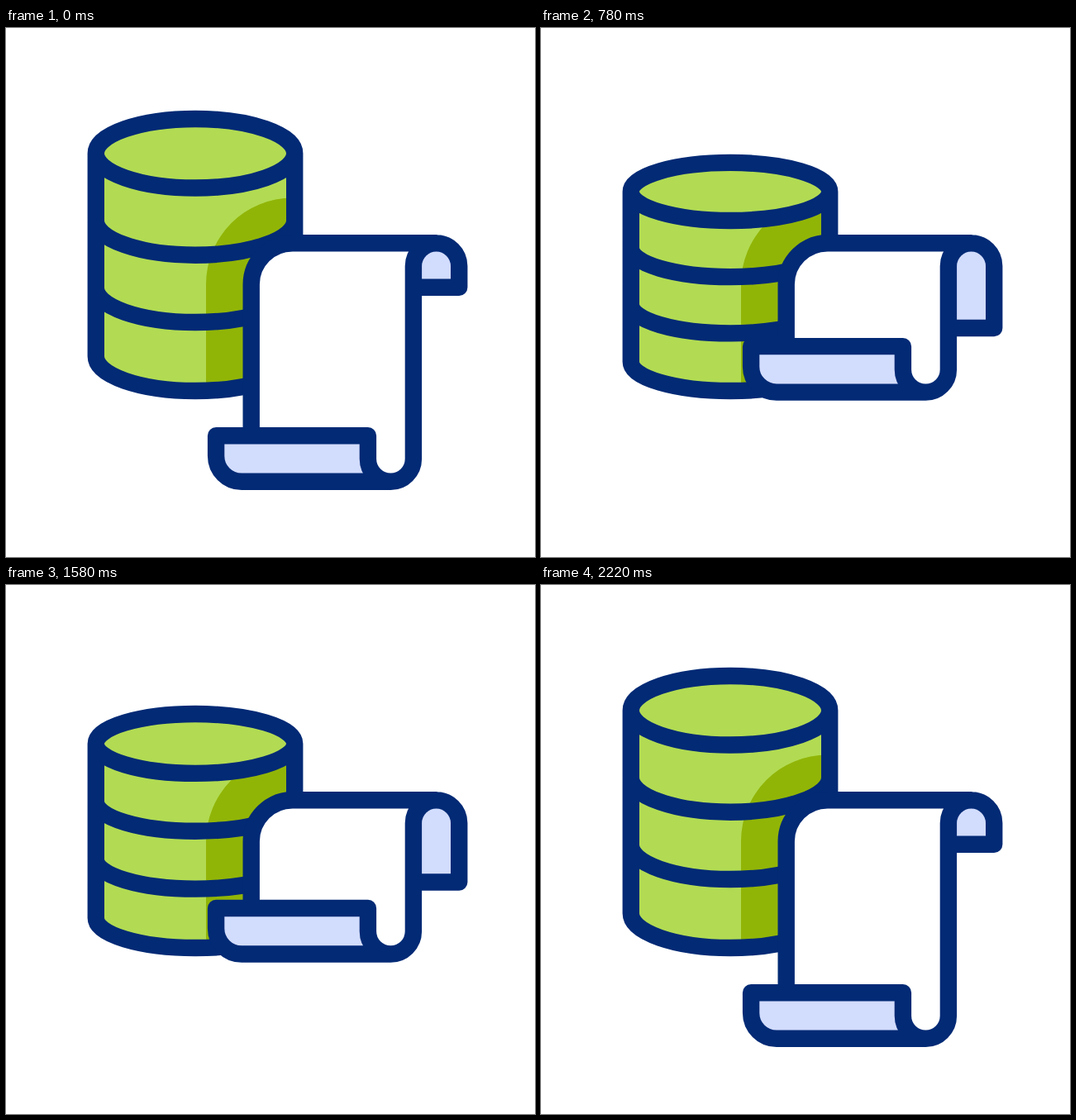
Animation, 640 px wide and 640 px high, one loop 2.42 s. Source, as an HTML page:

```html
<!DOCTYPE html>
<html lang="en">
<head>
<meta charset="utf-8">
<title>Database and scroll</title>
<style>
  html, body { margin: 0; width: 100%; height: 100%; overflow: hidden; background: #fff; }
  svg { display: block; width: 100vw; height: 100vh; }
  .line { fill: none; stroke: #022a75; stroke-width: 20.4; stroke-linecap: round; stroke-linejoin: round; }
  .light { fill: #b2db53; }
  .dark { fill: #91b507; }
  .curl { fill: #d2dcfd; }
  .paper { fill: #fff; }
</style>
</head>
<body>
<svg viewBox="0 0 640 640">
  <clipPath id="clip"><path id="clipBody"/></clipPath>
  <path id="body" class="light"/>
  <path class="dark" clip-path="url(#clip)" d="M242 450V310A104.5 104.5 0 0 1 346.5 205.5H360V450Z"/>
  <ellipse id="lid" class="light" cx="229" rx="120.2"/>
  <path id="drumLines" class="line"/>
  <path id="paper" class="paper"/>
  <path id="topCurl" class="curl"/>
  <path id="bottomCurl" class="curl"/>
  <path id="scrollLines" class="line"/>
</svg>
<script>
const LOOP = 2420;
const el = id => document.getElementById(id);
const draw = (id, d) => el(id).setAttribute('d', d);

// Each pose: drum height scale, bottom of the scroll, bottom of the top curl
const tall = [1, 548.8, 313.8];
const short = [0.8, 414.3, 375];
const stretched = [1.075, 562, 304];

// Segments: start, end, from, to, end handle of the easing curve
const segments = [
  [200, 1035, tall, short, 0.62],
  [1400, 2000, short, stretched, 0.667],
  [2000, 2222, stretched, tall, 0.667]
];

// Cubic Bezier easing with handles (1/3, 0) and (handle, 1)
function ease(x, handle) {
  let lo = 0, hi = 1;
  for (let i = 0; i < 24; i++) {
    const u = (lo + hi) / 2, v = 1 - u;
    if (v * v * u + 3 * v * u * u * handle + u * u * u < x) lo = u; else hi = u;
  }
  return lo * lo * (3 - 2 * lo);
}

function pose(t) {
  let now = tall;
  for (const [start, end, from, to, handle] of segments) {
    if (t < start) break;
    const k = ease(Math.min(1, (t - start) / (end - start)), handle);
    now = from.map((a, i) => a + (to[i] - a) * k);
  }
  return now;
}

function drawDrum(scale) {
  const left = 108.8, right = 349.2, ry = 41.75 * scale;
  const level = h => 439 - h * scale - ry;   // h: height of an arc's lowest point
  const top = level(245.5), base = level(0);
  const arc = (y, sweep) => `A120.2 ${ry} 0 0 ${sweep} ${right} ${y}`;
  const front = y => `M${left} ${y}${arc(y, 0)}`;
  const body = `M${left} ${top}V${base}${arc(base, 0)}V${top}Z`;
  draw('body', body);
  draw('clipBody', body);
  el('lid').setAttribute('cy', top);
  el('lid').setAttribute('ry', ry);
  draw('drumLines', body.replace('Z', '') + `M${left} ${top}${arc(top, 1)}` +
    [245.5, 164.3, 83].map(h => front(level(h))).join(''));
}

function drawScroll(bottom, curlEnd) {
  const bar = bottom - 55.5, turn = bottom - 27.5;
  const edge = `M296.7 ${bar}V310A50 50 0 0 1 346.7 260.3H520.5`;
  const side = `492.9 288V${turn}A27.5 27.5 0 0 1 465.4 ${bottom}`;
  const fold = `A27.5 27.5 0 0 1 437.9 ${turn}V${bar}`;
  const topCurl = `M492.9 ${curlEnd}V288A27.65 27.65 0 0 1 548.2 288V${curlEnd}Z`;
  const bottomCurl = `M465.4 ${bottom}${fold}H254.1V${bottom - 31}A31 31 0 0 0 285.1 ${bottom}Z`;
  draw('paper', `${edge}A27.6 27.6 0 0 0 ${side}${fold}Z`);
  draw('topCurl', topCurl);
  draw('bottomCurl', bottomCurl);
  draw('scrollLines', `${edge}M${side}${topCurl}${bottomCurl}`);
}

function frame() {
  const [scale, bottom, curlEnd] = pose(performance.now() % LOOP);
  drawDrum(scale);
  drawScroll(bottom, curlEnd);
  requestAnimationFrame(frame);
}
frame();
</script>
</body>
</html>
```
